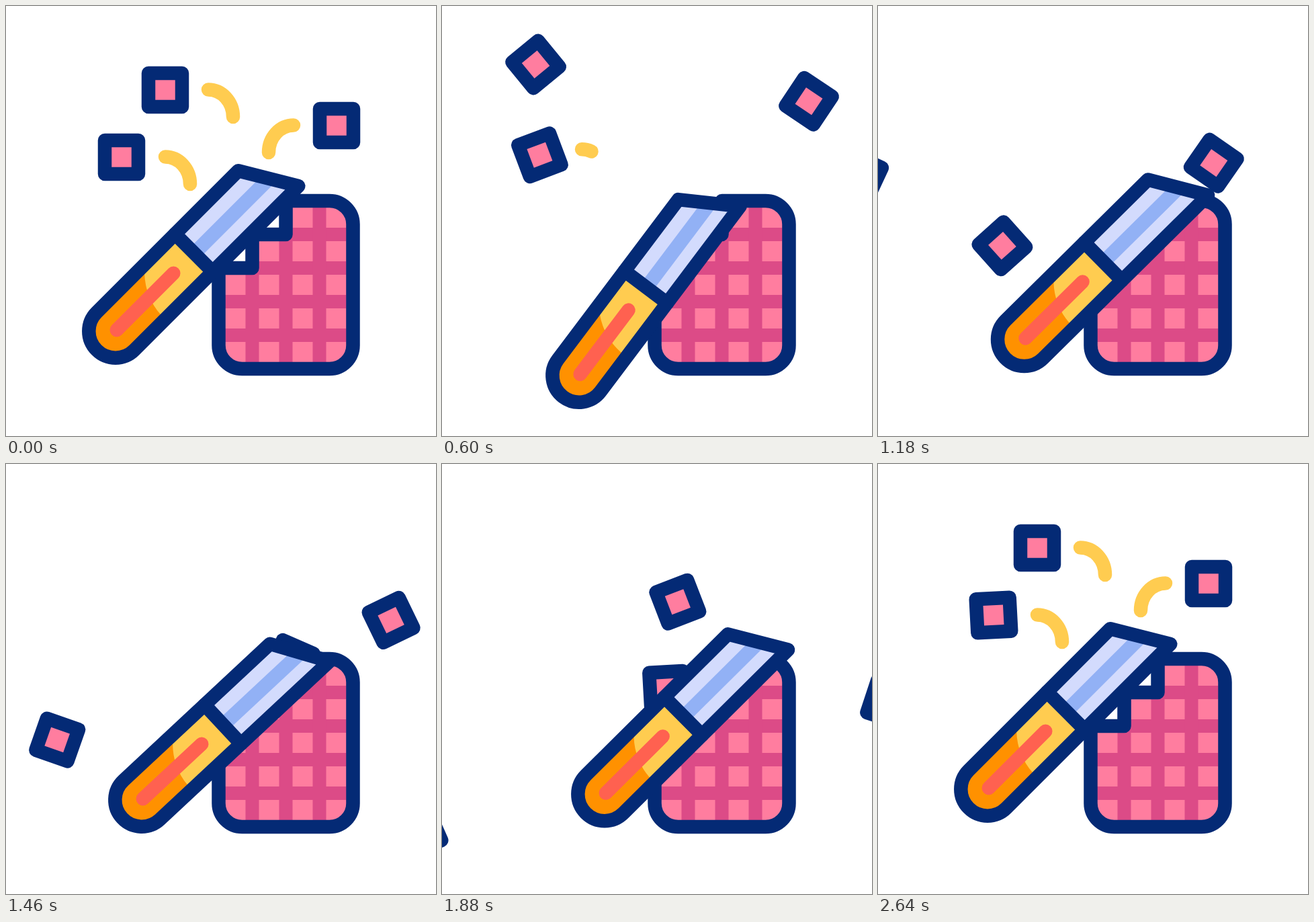
Recreate the animation shown at these times as an HTML page with a canvas. Size 640 px wide and 640 px high, loop 3000 ms.

```html
<!DOCTYPE html>
<html>
<head>
<meta charset="utf-8">
<style>
html, body { margin: 0; height: 100%; overflow: hidden; background: #fff; }
canvas { display: block; width: 100vmin; height: 100vmin; }
</style>
</head>
<body>
<canvas id="stage" width="640" height="640"></canvas>
<script>
const ctx = document.getElementById('stage').getContext('2d');
const LOOP = 3000, LAST_MOVE = 2640, RAMP = 298;
const NAVY = '#042a75', PINK = '#ff7d9f', ROSE = '#dc4b87', YELLOW = '#ffcc50';

const clamp = v => Math.min(1, Math.max(0, v));
const linear = z => z;
const smooth = z => (1 - Math.cos(Math.PI * z)) / 2;

// Main turning points of the sawing stroke: time, handle position, angle.
const STROKE = [
  { t: 220, x: 163, y: 484, angle: -45 },
  { t: 600, x: 204, y: 550, angle: -53 },
  { t: 900, x: 235, y: 499.5, angle: -47.6 },
  { t: 1460, x: 202, y: 500, angle: -43 },
  { t: 1880, x: 242, y: 491.5, angle: -44.8 },
  { t: 2260, x: 234, y: 459, angle: -35.5 },
  { t: 2600, x: 163, y: 484, angle: -45 }
];

// Each resting cube is thrown out, and another one lands in its place.
const RESTING = [
  {
    x: 237, y: 125,
    out: { start: 220, vx: -0.42, vy: -0.252, ay: 0.00038, spin: -0.17 },
    back: { start: 1383, length: 1141, ease: smooth, dx: 190, dy: 173, bend: 1.5, turn: 115 }
  },
  {
    x: 172, y: 225,
    out: { start: 372, vx: -0.302, vy: -0.05, ay: 0.00014, spin: -0.235 },
    back: { start: 1800, length: 840, ease: linear, dx: 180, dy: 143, bend: 2.65, turn: 199, tilt: -3 }
  },
  {
    x: 492, y: 178,
    out: { start: 302, vx: 0.36, vy: -0.32, ay: 0.00052, spin: 0.225 },
    back: { start: 1885, length: 650, ease: smooth, dx: -150, dy: 196, bend: 1.5, turn: -105 }
  }
];

// Cubes cut off in mid stroke.
const CUT = [
  { start: 775, x: 393, y: 332, vx: -0.586, vy: -0.0165, ax: 0.000181, ay: 0.000191, spin: -0.103 },
  { start: 850, x: 400, y: 320, vx: 0.323, vy: -0.4, ax: -0.000065, ay: 0.00042, spin: 0.105 }
];

const ARCS = [
  { x: 301, y: 165, dir: 1, hide: 220, show: 2090 },
  { x: 237, y: 265, dir: 1, hide: 360, show: 2280 },
  { x: 428, y: 218, dir: -1, hide: 220, show: 2160 }
];

// Throw with constant acceleration; a ramp makes the start gentle.
function thrown({ start, x, y, vx, vy, ax = 0, ay, spin, ramp = 0 }, t) {
  const time = Math.max(0, t - start);
  const s = time < ramp ? time * time / (2 * ramp) : time - ramp / 2;
  return { x: x + vx * s + ax * s * s, y: y + vy * s + ay * s * s, angle: spin * s };
}

function landing({ x, y, back }, t) {
  const left = 1 - back.ease(clamp((t - back.start) / back.length));
  return {
    x: x + back.dx * left,
    y: y + back.dy * left ** back.bend,
    angle: back.turn * left + (back.tilt || 0)
  };
}

// Smooth curve through the turning points, at rest at both ends.
function knifePose(t) {
  const last = STROKE.length - 1;
  const time = Math.min(STROKE[last].t, Math.max(STROKE[0].t, t));
  const i = Math.min(last, STROKE.findIndex((k, j) => j && k.t >= time)) - 1;
  const a = STROKE[i], b = STROKE[i + 1], span = b.t - a.t, s = (time - a.t) / span;
  const curve = key => {
    const slope = j => j === 0 || j === last ? 0
      : (STROKE[j + 1][key] - STROKE[j - 1][key]) / (STROKE[j + 1].t - STROKE[j - 1].t) * span;
    return a[key] + (b[key] - a[key]) * s * s * (3 - 2 * s) +
      slope(i) * s * (1 - s) ** 2 - slope(i + 1) * s * s * (1 - s);
  };
  return { x: curve('x'), y: curve('y'), angle: curve('angle') };
}

function placed({ x, y, angle }, draw) {
  ctx.save();
  ctx.translate(x, y);
  ctx.rotate(angle * Math.PI / 180);
  draw();
  ctx.restore();
}

function fill(color, path) {
  ctx.fillStyle = color;
  ctx.fill(path);
}

function stroke(color, path) {
  ctx.strokeStyle = color;
  ctx.stroke(path);
}

const meat = new Path2D('M416.5 290h65a35 35 0 0 1 35 35v180a35 35 0 0 1 -35 35' +
  'h-130a35 35 0 0 1 -35 -35v-115h50v-50h50z');
const cube = new Path2D('M-25 -25h50v50h-50z');
const knife = new Path2D('M0 -39.7H298L345.300 39.7H0A39.7 39.7 0 0 1 0 -39.7Z');
const blade = new Path2D('M165 -39.7H298L345.300 39.7H165Z');
const shine = new Path2D('M165 -9.5H316L328.500 11.5H165Z');
const grip = new Path2D('M0 -39.7H91V-30Q67 -4 65 30V39.7H0A39.7 39.7 0 0 1 0 -39.7Z');
const groove = new Path2D('M2.5 0H122');
const collar = new Path2D('M165 -39.7V39.7');

function drawMeat() {
  fill(PINK, meat);
  ctx.save();
  ctx.clip(meat);
  ctx.fillStyle = ROSE;
  for (let i = 0; i < 4; i++) {
    ctx.fillRect(356.5 + 50 * i, 290, 20, 250);
    ctx.fillRect(316.5, 330 + 50 * i, 200, 20);
  }
  ctx.restore();
  stroke(NAVY, meat);
}

function drawCube() {
  fill(PINK, cube);
  stroke(NAVY, cube);
}

function drawKnife() {
  fill(YELLOW, knife);
  fill('#ff9100', grip);
  fill('#d3dbfd', blade);
  fill('#92b1f5', shine);
  stroke('#ff6150', groove);
  stroke(NAVY, collar);
  stroke(NAVY, knife);
}

// A quarter arc that drifts off while it shortens, and later grows back.
function drawArc({ x, y, dir, hide, show }, t) {
  const gone = smooth(clamp((t - hide) / 364)), back = smooth(clamp((t - show) / 320));
  const growing = t >= show;
  const from = growing ? 1 - back : 0, to = growing ? 1 : 1 - gone;
  if (to - from < 0.01) return;
  const shift = growing ? 0 : gone;
  const angle = s => -Math.PI / 2 + dir * s * Math.PI / 2;
  const path = new Path2D();
  path.ellipse(x - dir * 39 * shift, y - 15 * shift, 37, 40.5, 0, angle(from), angle(to), dir < 0);
  stroke(YELLOW, path);
}

function draw(t) {
  ctx.clearRect(0, 0, 640, 640);
  ctx.lineWidth = 20.5;
  ctx.lineCap = ctx.lineJoin = 'round';
  for (const c of RESTING) {
    placed(thrown({ x: c.x, y: c.y, ramp: RAMP, ...c.out }, t), drawCube);
    if (t >= c.back.start) placed(landing(c, t), drawCube);
  }
  for (const c of CUT) if (t >= c.start) placed(thrown(c, t), drawCube);
  drawMeat();
  for (const arc of ARCS) drawArc(arc, t);
  placed(knifePose(t), drawKnife);
}

function tick() {
  draw(Math.min(performance.now() % LOOP, LAST_MOVE));
  requestAnimationFrame(tick);
}
tick();
</script>
</body>
</html>
```
